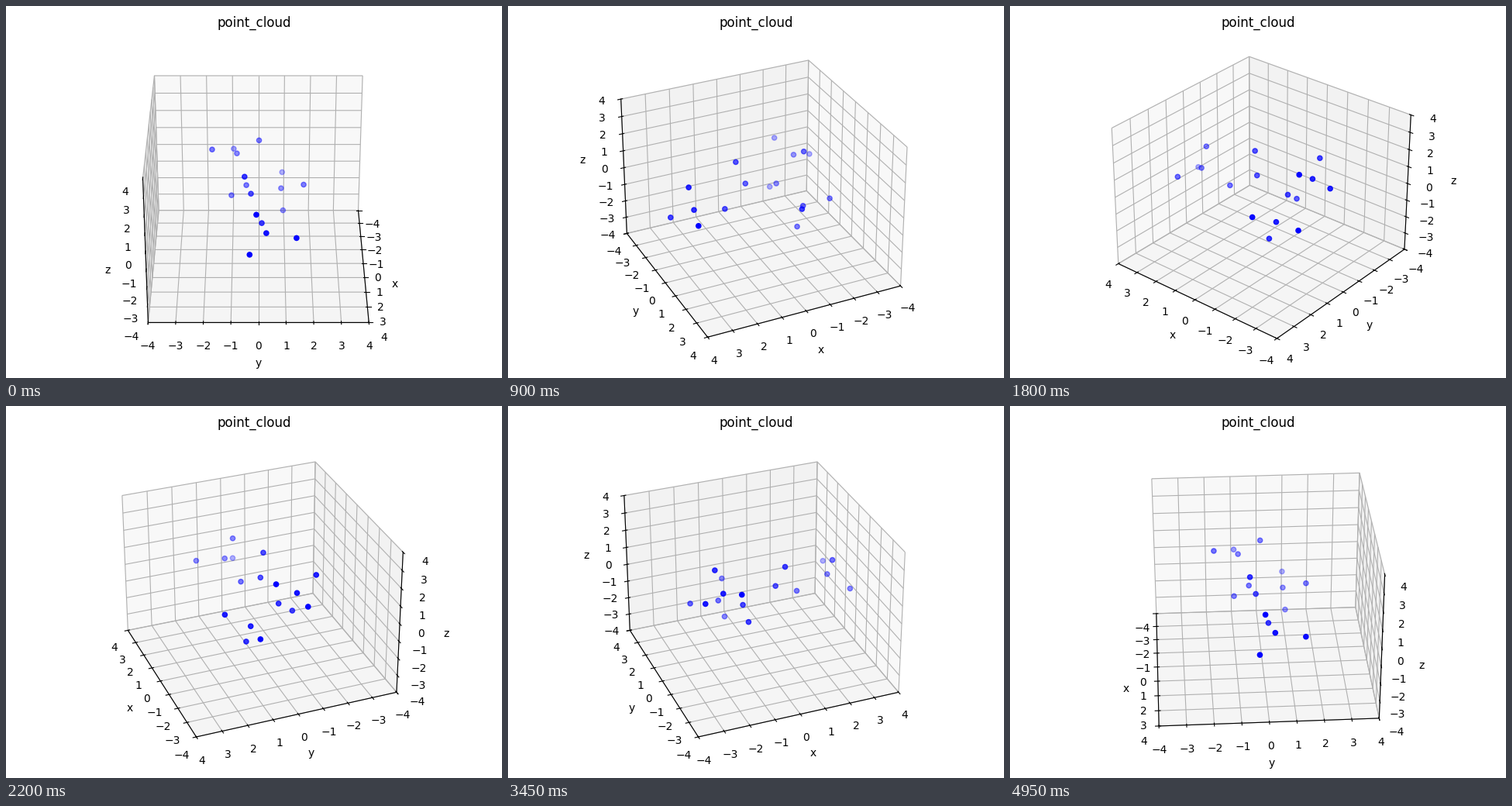
Recreate the animation shown at these times as a matplotlib script. Size 640 by 480 pixels, loop 5000 ms.

```python
import matplotlib.pyplot as plt
import numpy as np
from matplotlib.animation import FuncAnimation

FRAMES = 100
STEP = 360 / FRAMES
QUARTER = FRAMES // 4
ELEV = 30
TOP = 1 - 35.33 / 480
BOND = 1.12
SHORT = 0.81


def unit(v):
    return v / np.linalg.norm(v)


def methyl(base, root, ref, twist, first=BOND):
    """Three tetrahedral bonds at base, turned about the line from root."""
    axis = unit(base - root)
    away = root - ref
    e = unit(away - axis * (away @ axis))
    f = np.cross(axis, e)
    lean = np.sqrt(8) / 3
    for j, length in enumerate((first, BOND, BOND)):
        a = np.radians(twist + 120 * j)
        yield base + length * (axis / 3 + lean * (e * np.cos(a) + f * np.sin(a)))


def cloud():
    """A small molecule: a given skeleton, its other points from bond geometry."""
    hub, left, back, acid, double, bridge, tail = skeleton = np.array([
        (-0.89, -0.46, -0.09), (-1.80, -0.82, 1.07), (-1.39, 0.86, -0.65),
        (0.50, -0.28, 0.48), (0.79, -0.51, 1.66), (1.54, 0.12, -0.38),
        (2.87, 0.28, 0.12),
    ])
    spread = sum(unit(p - hub) for p in (left, back, acid))
    return np.array([
        *skeleton,
        hub - SHORT * unit(spread),
        *methyl(left, hub, acid, 2, SHORT),
        *methyl(back, hub, acid, 31),
        *methyl(tail, bridge, acid, 67),
    ])


fig = plt.figure(figsize=(6.4, 4.8), dpi=100)
ax = fig.add_subplot(projection="3d")
ax.scatter(*cloud().T, c="b")
ticks = range(-4, 5)
ax.set(title="point_cloud", xlabel="x", ylabel="y", zlabel="z",
       xlim=(-4, 4), ylim=(-4, 4), zlim=(-4, 4),
       xticks=ticks, yticks=ticks, zticks=ticks)


def turn(k):
    ax.view_init(elev=ELEV, azim=STEP * k)


def fitted_bottom(k):
    """Lower margin that keeps the tick labels inside the figure."""
    turn(k)
    fig.draw_without_rendering()
    fig.tight_layout()
    fig.subplots_adjust(top=TOP)
    return fig.subplotpars.bottom


# The box is square, so the margins repeat every quarter turn.
bottoms = [fitted_bottom(k) for k in range(QUARTER)]


def update(k):
    turn(k)
    fig.subplots_adjust(bottom=bottoms[k % QUARTER])
    return []


update(0)
anim = FuncAnimation(fig, update, frames=FRAMES, interval=50,
                     repeat=True, repeat_delay=0, blit=False)
plt.show()
```
